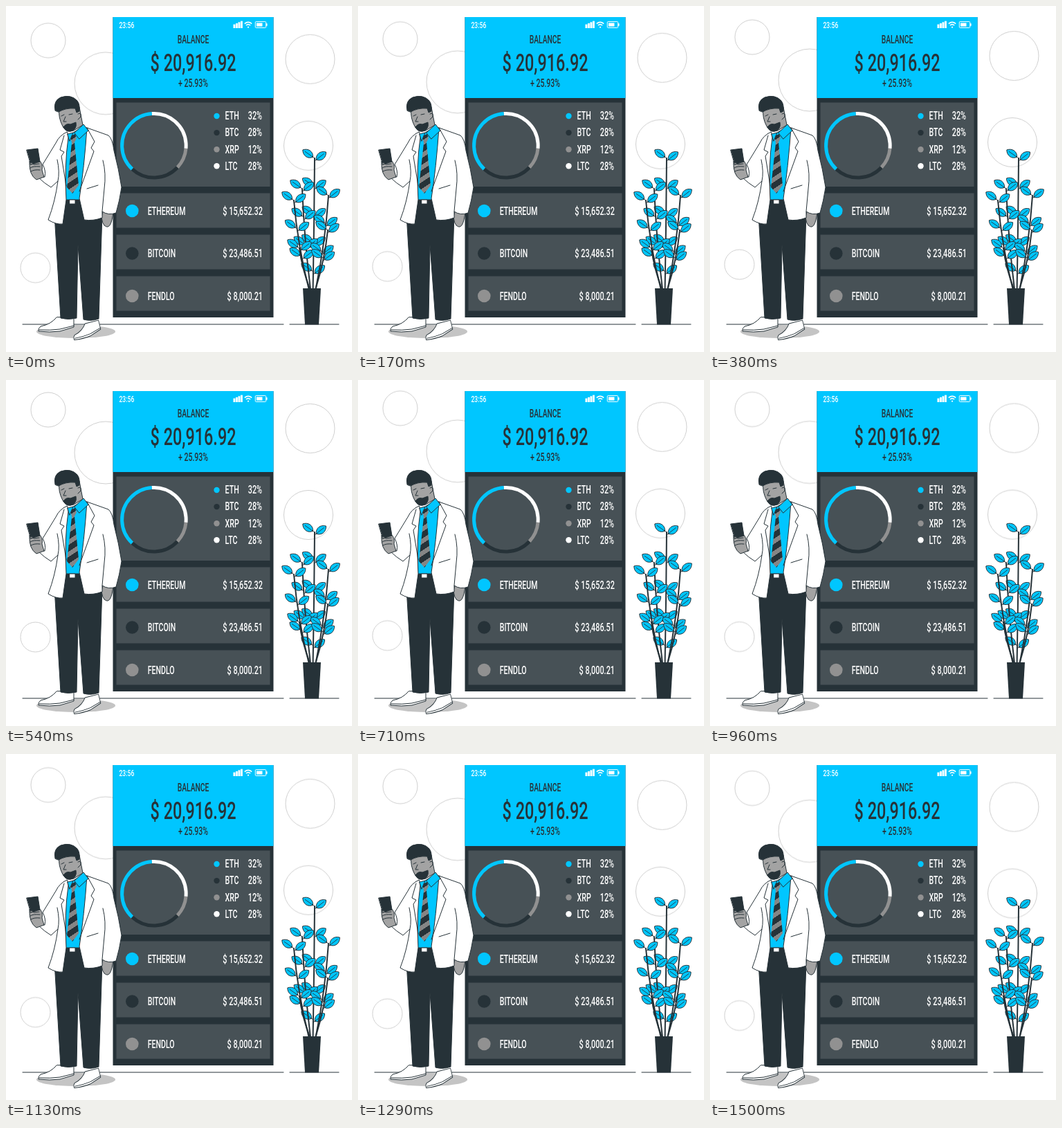
An HTML page that plays this animation: 500x500 px, repeating every 1.54 s.

```html
<!DOCTYPE html>
<html lang="en">
<head>
<meta charset="utf-8">
<title>Wallet balance</title>
<style>
  html, body { margin: 0; width: 100%; height: 100%; overflow: hidden; background: #fff; }
  svg { display: block; width: 100vw; height: 100vh; }
  text { font: 500 16px Roboto, "Open Sans", sans-serif; }
  .ink { fill: none; stroke: #263238; stroke-linecap: round; stroke-linejoin: round; }
  .dark { fill: #263238; }
  .blue { fill: #00c6ff; }
  .skin { fill: #a3a3a3; }
  .white { fill: #fff; }
</style>
</head>
<body>
<svg viewBox="0 0 500 500">
  <defs>
    <linearGradient id="stripes" gradientUnits="userSpaceOnUse" x1="96" y1="200" x2="104" y2="212" spreadMethod="repeat">
      <stop offset=".55" stop-color="#263238"/>
      <stop offset=".55" stop-color="#858585"/>
    </linearGradient>
    <g id="shoe">
      <path class="white" d="M26 0Q18 10 3 13Q-1 16 0 20Q16 22 31 20L51 14V0Z"/>
      <path d="M1 18Q17 19 31 17L51 12"/>
    </g>
  </defs>

  <g id="floats" fill="none" stroke="#cfcfcf"></g>
  <ellipse cx="101" cy="470.5" rx="57" ry="9.5" fill="#c4c4c4"/>
  <path class="ink" d="M24 460H401M410 460H481"/>

  <g id="app">
    <rect class="dark" x="154.5" y="16" width="232" height="434"/>
    <rect class="blue" x="154.5" y="16" width="232" height="117"/>
  </g>
  <g id="status" class="white">
    <path d="M362 24.5h8.5v5H362zM376 25.2h1.6v3.6H376z"/>
    <path d="M344.8 25.6q5.2-4.4 10.4 0M346.8 28q3.2-2.6 6.4 0M349 30.6h2" fill="none" stroke="#fff" stroke-width="1.6"/>
    <rect x="360.3" y="22.6" width="15.4" height="8.8" rx="1" fill="none" stroke="#fff"/>
  </g>
  <g id="ring" fill="none" stroke-width="5" transform="translate(213.9 201.7)"></g>
  <g id="labels"></g>

  <g id="plant" class="ink">
    <path class="dark" stroke="none" d="M429 408H455L452 460.5H432Z"/>
  </g>

  <g id="man" class="ink">
    <use href="#shoe" x="47" y="450"/>
    <use href="#shoe" transform="translate(94 464) rotate(-14) scale(.8 .95)"/>
    <path class="dark" d="M70 300L79 451Q90 454 102 451L104 345L112 453Q123 456 134 452L139 300L106 284H87Z"/>
    <path class="skin" d="M140 297Q136 309 142 317Q152 326 155 297Z"/>

    <path class="blue" d="M86 190L113 173L119 187L107 282H87Z"/>
    <path class="dark" d="M87 280H107V286H87Z"/>
    <path class="white" d="M92 280H100V286H92Z"/>
    <path d="M93 188L100 185L102 191L99 197L105 259L96 271L88 262L95 198Z" fill="url(#stripes)" stroke="none"/>

    <path class="white" d="M88 182Q77 187 72 198L53 229Q58 238 56 247H46Q55 256 65 262L75 253Q71 283 61 309Q72 316 82 315L87 280Q84 232 90 190Z"/>
    <path d="M74 222Q78 240 75 253M84 187L78 208L84 211L80 217L87 260"/>
    <path class="white" d="M117 176L148 187Q154 192 156 209Q163 236 167 262Q164 282 159 299Q148 303 139 297V306Q126 311 113 309L106 278Q113 234 117 176Z"/>
    <path d="M117 176L128 196L123 205L127 210L106 268M140 223Q145 242 142 264L139 297M117 264L133 259"/>

    <path class="skin" d="M34 225L47 222Q54 228 52 237L55 247L44 251Q33 244 34 225Z"/>
    <path class="dark" d="M30 208L46 206L49 225L36 229Z"/>
    <path class="skin" d="M34 228Q37 224 40 229L48 228M35 234Q39 231 49 232M36 239Q41 236 49 237"/>

    <path class="skin" d="M77 148Q75 161 82 174Q88 184 98 180L111 172L106 146Z"/>
    <path class="blue" d="M99 183L112 171L119 180L106 192ZM89 185L97 183L92 195Z"/>
    <path class="dark" d="M71 151Q68 137 79 132Q94 127 103 137Q107 142 106 152L102 154L100 148Q86 147 76 153Z"/>
    <path class="dark" d="M83 175Q87 169 93 171L101 168Q103 179 93 181Q86 182 83 175Z"/>
    <path d="M80 159L84 157M91 157L96 156M86 160L83 167H87M87 175L91 174M104 156Q109 153 108 160L104 164"/>
  </g>
</svg>
<script>
const NS = "http://www.w3.org/2000/svg";
const LOOP = 1540, RISE = 10, NARROW = 0.66;
const BLUE = "#00c6ff", DARK = "#263238", GRAY = "#919191", WHITE = "#fff";
const $ = id => document.getElementById(id);

function add(parent, tag, attrs, text) {
  const el = document.createElementNS(NS, tag);
  for (const k in attrs) el.setAttribute(k, attrs[k]);
  if (text) el.textContent = text;
  return parent.appendChild(el);
}

// One condensed face for every label
function label(x, y, size, text, anchor = "start", fill = WHITE) {
  add($("labels"), "text", {
    transform: `translate(${x} ${y}) scale(${NARROW} 1)`,
    style: `font-size:${size}px`, "text-anchor": anchor, fill
  }, text);
}

function dot(cx, cy, r, fill) {
  add($("labels"), "circle", { cx, cy, r, fill });
}

function panel(y, height) {
  add($("app"), "rect", { x: 159.5, y, width: 222, height, fill: "#475156" });
}

for (let i = 0; i < 4; i++) {
  const height = 5.5 + i * 1.6;
  add($("status"), "rect", { x: 328.5 + i * 3.5, y: 32 - height, width: 2.9, height });
}
label(163.5, 32, 13, "23:56");
label(270.5, 54, 15.6, "BALANCE", "middle", DARK);
label(270.5, 94, 35.5, "$ 20,916.92", "middle", DARK);
label(270.5, 117, 16, "+ 25.93%", "middle", DARK);

panel(139.5, 121.5);
let turn = 43;
for (const [share, stroke] of [[25, DARK], [37, BLUE], [27.5, WHITE], [10.5, GRAY]]) {
  add($("ring"), "circle", {
    r: 46.3, stroke, pathLength: 100, "stroke-dasharray": `${share} ${100 - share}`,
    transform: `rotate(${turn})`
  });
  turn += share * 3.6;
}

[["ETH", "32%", BLUE], ["BTC", "28%", DARK], ["XRP", "12%", GRAY], ["LTC", "28%", WHITE]]
  .forEach(([name, share, color], i) => {
    const y = 159 + i * 24.1;
    dot(304.5, y, 4.2, color);
    label(316.5, y + 5.3, 16.2, name);
    label(370, y + 5.3, 16.4, share, "end");
  });

[["ETHEREUM", "$ 15,652.32", BLUE], ["BITCOIN", "$ 23,486.51", DARK], ["FENDLO", "$ 8,000.21", GRAY]]
  .forEach(([name, sum, color], i) => {
    const y = 296 + i * 61.5;
    panel(270.5 + i * 60, 50);
    dot(182.3, y, 9.3, color);
    label(204.8, y + 5.7, 16, name);
    label(371, y + 5.7, 16.5, sum, "end");
  });

function leaf({ x, y }, angle) {
  const g = add($("plant"), "g", { transform: `translate(${x} ${y}) rotate(${angle})` });
  add(g, "path", { d: "M3 0C7-7 16-7 21 0C16 7 7 7 3 0Z", class: "blue", "stroke-width": 0.9 });
  add(g, "path", { d: "M0 0H17", "stroke-width": 0.8 });
}

// A stem rises from the pot and carries leaf pairs from its tip downwards
function stem(tipX, tipY) {
  const lean = tipX - 443, base = 443 + lean * 0.2;
  const path = add($("plant"), "path", {
    d: `M${base} 409Q${base + lean * 0.6} ${(409 + tipY) / 2} ${tipX} ${tipY}`, "stroke-width": 2
  });
  const length = path.getTotalLength();
  for (let at = length; at > 25; at -= 41) {
    leaf(path.getPointAtLength(at), 215);
    leaf(path.getPointAtLength(at - 4), -38);
  }
}
for (const [x, y] of [[446, 220], [428, 264], [416, 281], [466, 274], [465, 324], [424, 350]]) stem(x, y);

for (const [cx, cy, r] of [[61, 50, 25], [144, 112, 45], [439.5, 77, 35.5], [437, 202, 35.5], [42.5, 378.5, 21.5]])
  add($("floats"), "circle", { cx, cy, r });

$("floats").animate(
  [0, -RISE, 0].map(y => ({ transform: `translateY(${y}px)` })),
  { duration: LOOP, iterations: Infinity, easing: "linear" }
);
</script>
</body>
</html>
```
